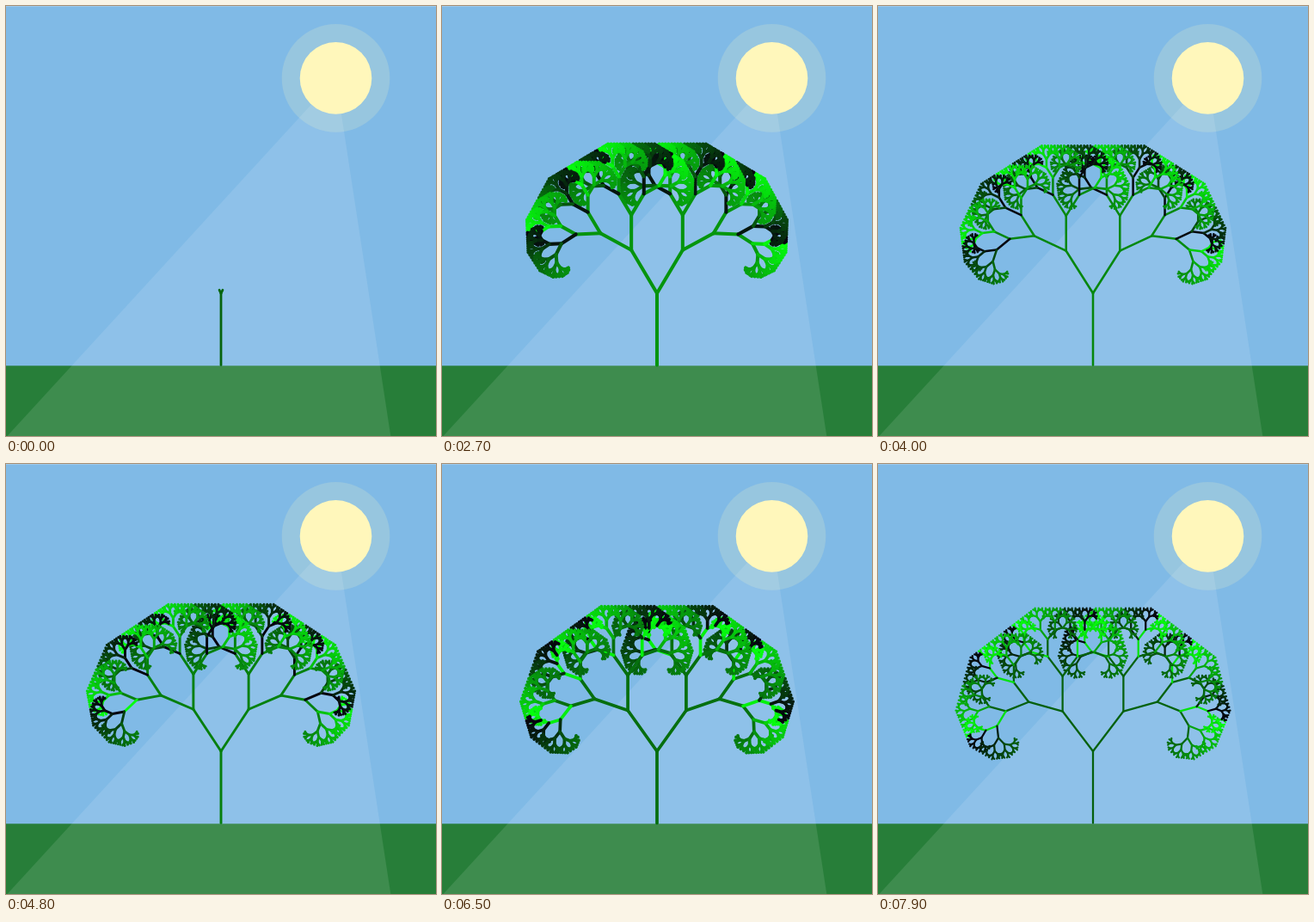
Recreate the animation shown at these times as an HTML page with a canvas. Size 500 px wide and 500 px high, loop 8000 ms.

```html
<!DOCTYPE html>
<html lang="en">
<head>
<meta charset="utf-8">
<title>Growing tree</title>
<style>
  html, body { margin: 0; width: 100%; height: 100%; overflow: hidden; background: #80bae6; }
  canvas { display: block; width: 500px; height: 500px; }
</style>
</head>
<body>
<canvas id="stage"></canvas>
<script>
const LOOP = 8000, STEP = 100, DEPTH = 10;
const TRUNK = 83.4, BASE = 417.4, MIN_LENGTH = 1.66;

const canvas = document.getElementById('stage');
const ctx = canvas.getContext('2d');
const dpr = window.devicePixelRatio || 1;
canvas.width = canvas.height = 500 * dpr;
ctx.scale(dpr, dpr);
ctx.lineCap = 'round';

const mod = (a, b) => ((a % b) + b) % b;

function disc(x, y, r, fill) {
  ctx.fillStyle = fill;
  ctx.beginPath();
  ctx.arc(x, y, r, 0, Math.PI * 2);
  ctx.fill();
}

function scene() {
  ctx.fillStyle = '#80bae6';
  ctx.fillRect(0, 0, 500, 500);
  ctx.fillStyle = 'rgba(255,255,255,.22)';
  ctx.fillRect(0, 0, 500, 1);
  ctx.fillStyle = '#277e39';
  ctx.fillRect(0, 418.3, 500, 82);
  disc(383.5, 83.9, 62.8, 'rgba(255,247,187,.18)');
  ctx.fillStyle = 'rgba(255,255,255,.105)';
  ctx.beginPath();
  ctx.moveTo(383.5, 83.5);
  ctx.lineTo(1.5, 500);
  ctx.lineTo(447.3, 500);
  ctx.fill();
  disc(383.5, 83.9, 41.8, '#fff7bb');
}

// t is in seconds
const ratioAt = t => Math.min(0.7, 0.05 + 0.06 * t + 0.0097 * t ** 4);
const angleAt = t => (31.5 + 1.26 * (t - 3.3)) * Math.PI / 180;
const weightAt = t => 2 + 0.47 * mod(t - 2.85, 4.5);
const greenAt = t => t < 2.55 ? 100 - 13 * t : 142 - 10 * (t - 3.3);

function tree(t) {
  const ratio = ratioAt(t), turn = angleAt(t);
  let green = Math.round(greenAt(t));
  ctx.lineWidth = weightAt(t);

  // Each branch takes the next green; the right side grows first.
  function branch(x, y, length, angle, level) {
    const x2 = x + length * Math.sin(angle);
    const y2 = y - length * Math.cos(angle);
    ctx.strokeStyle = `rgb(6,${mod(green++, 256)},14)`;
    ctx.beginPath();
    ctx.moveTo(x, y);
    ctx.lineTo(x2, y2);
    ctx.stroke();
    const next = length * ratio;
    if (level === DEPTH || next < MIN_LENGTH) return;
    branch(x2, y2, next, angle + turn, level + 1);
    branch(x2, y2, next, angle - turn, level + 1);
  }
  branch(250, BASE, TRUNK, 0, 0);
}

let shown = -1;
const start = performance.now();

function tick() {
  const step = Math.floor(mod(performance.now() - start, LOOP) / STEP);
  if (step !== shown) {
    shown = step;
    scene();
    tree(step * STEP / 1000);
  }
  requestAnimationFrame(tick);
}
tick();
</script>
</body>
</html>
```
